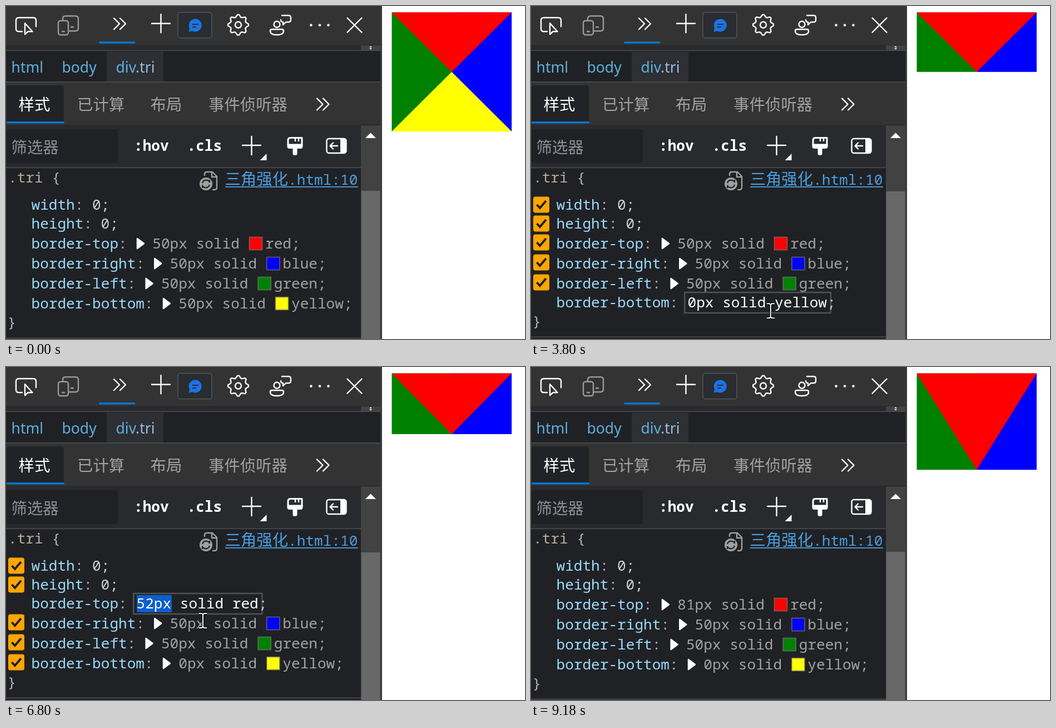
These frames come from a looping animation (933 px wide and 600 px high, 9.21 s). An HTML page:

```html
<!DOCTYPE html>
<html lang="zh">
<head>
<meta charset="utf-8">
<title>CSS border triangle</title>
<style>
  html, body { margin: 0; width: 100%; height: 100%; overflow: hidden; background: #fff; }
  svg { display: block; }
  text { white-space: pre; }
  .ui { font: 26.5px "Noto Sans", "Open Sans", sans-serif; }
  .cjk { font: 300 28.4px "Noto Sans CJK SC", "Noto Sans CJK", sans-serif; }
  .code { font: 26.1px "Noto Sans Mono", "DejaVu Sans Mono", monospace; }
  .bold { font-weight: 700; }
  .line { fill: none; stroke: #fff; stroke-width: 2.4; stroke-linecap: round; stroke-linejoin: round; }
  .dim { stroke: #9a9a9a; }
</style>
</head>
<body>
<svg width="933" height="600" viewBox="0 0 933 600">
  <!-- panel backgrounds -->
  <rect width="676" height="600" fill="#202124"/>
  <rect width="674" height="70" fill="#333"/>
  <rect y="70" width="674" height="10" fill="#292a2d"/>
  <rect x="638" y="71" width="35" height="9" fill="#424242"/>
  <path d="M653 74.5l2.500-2.500 2.500 2.500zM653 76l2.500 2.500 2.500-2.500z" fill="#fff"/>
  <rect y="79.500" width="674" height="1.500" fill="#494c50"/>
  <rect x="181" y="82" width="102" height="54" fill="#2d2f33"/>
  <rect y="136" width="674" height="1.800" fill="#494c50"/>
  <rect y="138" width="674" height="76" fill="#333"/>
  <path d="M1 211V147q0-4 4-4h95q4 0 4 4v64z" fill="#222326"/>
  <rect x="1" y="208" width="104" height="3.500" rx="1.500" fill="#0078d4"/>
  <rect y="214" width="638" height="77" fill="#292a2d"/>
  <rect x="1" y="222" width="200" height="61" rx="4" fill="#202124"/>
  <rect y="290.500" width="638" height="1.600" fill="#494c50"/>
  <rect x="638" y="215" width="35" height="385" fill="#424242"/>
  <path d="M646 238l9.500-9.500 9.500 9.500z" fill="#fff"/>
  <rect x="673" width="3" height="600" fill="#3a3b3e"/>

  <!-- main toolbar -->
  <g class="line">
    <path d="M29 46h-6q-5 0-5-5V26q0-5 5-5h26q5 0 5 5v11M34 31v20l5.500-5h8z"/>
    <path class="dim" d="M102 25v-2q0-5 5-5h18q5 0 5 5v17q0 5-5 5h-11M117 38h4"/>
    <rect class="dim" x="94" y="26.500" width="18" height="25.500" rx="4"/>
    <path class="dim" d="M101 46h4"/>
    <path d="M194 22l10 10-10 10M205 22l10 10-10 10M262 31.500h33M278.500 15v33"/>
    <path id="gear"/>
    <circle cx="417.500" cy="34" r="5.500"/>
    <circle cx="487" cy="33" r="5.500"/>
    <path d="M478 42h18q3 0 3 3 0 7-12 7t-12-7q0-3 3-3zM496 17h12q4 0 4 4v4q0 4-4 4h-5l-5 5v-5q-4 0-4-4"/>
    <path d="M613.500 21.500l26 26M639.500 21.500l-26 26"/>
  </g>
  <rect x="167" y="64" width="65.500" height="3.600" rx="1.800" fill="#0078d4"/>
  <rect x="309" y="11.500" width="61" height="46" rx="4" fill="#292c30" stroke="#52565b" stroke-width="1.500"/>
  <path d="M328.500 46.500l1.500-6.500a11.500 11.500 0 1 1 5 5z" fill="#1a73e8"/>
  <path d="M335 33h11M335 38h7" stroke="#292c30" stroke-width="2"/>
  <g fill="#fff"><circle cx="548.500" cy="34.500" r="2.300"/><circle cx="564" cy="34.500" r="2.300"/><circle cx="579.500" cy="34.500" r="2.300"/></g>

  <!-- breadcrumbs and tabs -->
  <g class="ui" fill="#5db0e0">
    <text x="9.500" y="120">html</text>
    <text x="100.500" y="120">body</text>
    <text x="197.500" y="120">div<tspan fill="#9bbbdc">.tri</tspan></text>
  </g>
  <g class="cjk" fill="#a3a3a3">
    <text x="22.500" y="188" fill="#fff" style="font-weight:400">样式</text>
    <text x="128" y="188">已计算</text>
    <text x="259.500" y="188">布局</text>
    <text x="364" y="188">事件侦听器</text>
    <text x="9.500" y="265" fill="#8d9196">筛选器</text>
  </g>
  <path class="line" d="M559 166.500l10.500 10.500-10.500 10.500M570 166.500l10.500 10.500-10.500 10.500"/>

  <!-- styles toolbar -->
  <g class="code" fill="#fff">
    <text class="bold" x="230" y="261">:hov</text>
    <text class="bold" x="325.500" y="261">.cls</text>
  </g>
  <path class="line" d="M425 251h33M441.500 235v33"/>
  <path d="M468.500 266v12h-12z" fill="#fff"/>
  <path class="line" d="M507 250v-8q0-4.500 4.500-4.500h20.500v12.500z" style="stroke-width:3"/>
  <path d="M520 238v6M526 238v6" stroke="#fff" stroke-width="2.500"/>
  <path d="M505.500 249h28v4q0 4-4 4h-6v9q0 3-4 3t-4-3v-9h-6q-4 0-4-4z" fill="#fff"/>
  <rect class="line" x="576.500" y="239" width="35" height="26" rx="4"/>
  <path d="M601 239h7q4 0 4 4v18q0 4-4 4h-7z" fill="#fff"/>
  <path class="line" d="M596 252h-13M588 246.500l-5.500 5.500 5.500 5.500"/>

  <!-- rule header -->
  <text class="code" x="4" y="318" fill="#b5ad9a">.tri <tspan fill="#b4b4b4">{</tspan></text>
  <g class="line" style="stroke:#a0a0a0">
    <path d="M357 305v-2q0-4 4-4h10l8 8v20q0 4-4 4h-3M370 299v9h9"/>
  </g>
  <circle cx="359.500" cy="320.500" r="11.500" fill="#a0a0a0"/>
  <path d="M353 319a7 7 0 0 1 12-3l1 2v-5M366 322a7 7 0 0 1-12 3l-1-2v5" fill="none" stroke="#202124" stroke-width="2.200"/>
  <text class="code" x="393.500" y="322" fill="#4a9fe0"><tspan class="cjk">三角强化</tspan>.html:10</text>
  <rect x="394" y="325" width="239" height="1.800" fill="#4a9fe0"/>

  <g id="rule" class="code"></g>
  <g id="preview"></g>
  <g id="arrow"><path d="M0 0v24.500l5.500-5 4.500 10 4.500-2-4.300-9.500h7.300z" fill="#fff" stroke="#000" stroke-width="1.200"/></g>
  <g id="beam" fill="none">
    <path id="beamShape" d="M-7-13h5l2 2 2-2h5M0-11v22M-7 13h5l2-2 2 2h5" stroke="#000" stroke-width="4.500"/>
    <use href="#beamShape" style="display:none"/>
    <path d="M-7-13h5l2 2 2-2h5M0-11v22M-7 13h5l2-2 2 2h5" stroke="#fff" stroke-width="2"/>
  </g>
</svg>
<script>
const LOOP = 9210, CHAR = 15.66, BLINK = 540;
const $ = id => document.getElementById(id);

// Pointer hot spot: time, x, y
const PATH = [
  [150, 412, 599], [700, 326, 538], [1410, 326, 538], [1570, 311, 538],
  [1750, 311, 538], [2070, 441.5, 561], [3690, 441.5, 561], [4330, 307, 415],
  [4500, 307, 415], [4600, 289, 430], [4990, 289, 430], [5340, 264, 430],
  [5560, 264, 430], [5770, 354, 457], [8430, 354, 457], [8620, 570, 482],
  [8800, 755, 553], [8960, 842, 602]
];
// Caret: time it is placed, index in the edited text
const CARETS = [[1570, 2], [2650, 1], [2770, 0], [2980, 1], [5390, 2]];

const ROWS = [
  { name: 'width', y: 367 },
  { name: 'height', y: 401 },
  { name: 'border-top', y: 437, color: 'red' },
  { name: 'border-right', y: 473, color: 'blue' },
  { name: 'border-left', y: 509, color: 'green' },
  { name: 'border-bottom', y: 545, color: 'yellow' }
];

const ease = u => u * u * (3 - 2 * u);

function pointer(t) {
  const i = PATH.findIndex(k => k[0] > t);
  if (i < 1) return null;
  const [t0, x0, y0] = PATH[i - 1], [t1, x1, y1] = PATH[i];
  const u = t0 >= 8430 ? (t - t0) / (t1 - t0) : ease((t - t0) / (t1 - t0));
  return { x: x0 + (x1 - x0) * u, y: y0 + (y1 - y0) * u };
}

const bottomSize = t => t < 2650 ? '50' : t < 2770 ? '5' : t < 2980 ? '' : '0';

const topSize = t => t < 6310 ? 50 : t < 6800 ? 51 :
  Math.min(81, 52 + Math.floor((t - 6800) / 31));

const editedRow = t => t < 860 || t >= 9130 ? -1 : t < 4740 ? 5 : 2;

const rect = (x, y, w, h, rest) =>
  `<rect x="${x}" y="${y}" width="${w}" height="${h}" ${rest}/>`;
const text = (x, y, fill, s) => `<text x="${x}" y="${y}" fill="${fill}">${s}</text>`;

function checkbox(y) {
  return rect(4, y - 14.5, 29, 29, 'rx="4" fill="#ffa500"') +
    `<path d="M10.500 ${y}l5.500 6 11-13" fill="none" stroke="#202124" stroke-width="4"/>`;
}

function caret(t, x, y) {
  const last = CARETS.filter(c => c[0] <= t).pop();
  if (!last || Math.floor((t - last[0]) / BLINK) % 2) return '';
  return rect(x + last[1] * CHAR - 0.8, y - 27, 2, 33, 'fill="#fff"');
}

function editor(t, x, y, value) {
  const w = value.length * CHAR;
  const all = t < 1570 || (t >= 4740 && t < 5390);
  const picked = all ? value.length : t >= 6310 ? 4 : 0;
  return rect(x - 6, y - 27, w + 12, 37, 'fill="#202124" stroke="#505256" stroke-width="2.500"') +
    rect(x, y - 24, picked * CHAR, 31, 'fill="#0a5fd0"') +
    text(x - 0.7, y, '#fff', value) + text(x + w - 0.7, y, '#ccc', ';') +
    (picked ? '' : caret(t, x, y));
}

function declaration(x, y, size, color) {
  const swatch = x + 46 + (size + ' solid ').length * CHAR;
  return `<path d="M${x + 16.5} ${y - 18}q0-2 2-1l12 9q1 1 0 2l-12 9q-2 1-2-1z" fill="#fff"/>` +
    text(x + 45, y, '#a3a3a3', size + ' solid ') +
    rect(swatch + 1, y - 20.5, 23, 23, `fill="${color}" stroke="#808080" stroke-opacity=".6" stroke-width="1.800"`) +
    text(swatch + 29.5, y, '#a3a3a3', color + ';');
}

function ruleMarkup(t, hover) {
  const editing = editedRow(t);
  const shift = editing < 0 ? 0 : 2;
  const sizes = [0, 0, topSize(t), 50, 50, bottomSize(t)];
  const rows = ROWS.map((row, i) => {
    const y = row.y - (shift && i >= editing ? 2 : 0);
    const end = 46 + (row.name.length + 1) * CHAR;
    const size = sizes[i] + 'px';
    let out = text(45.5, y, '#9bdcfd', `${row.name}<tspan fill="#b4b4b4">:</tspan>`);
    if (!row.color) out += text(end + CHAR - 0.7, y, '#d2d2d2', '0;');
    else if (i === editing) out += editor(t, end + 17, y, `${size} solid ${row.color}`);
    else out += declaration(end, y, size, row.color);
    if (hover && i !== editing) out += checkbox(y - (row.color ? 11 : 9));
    return out;
  });
  return rect(0, 597.5 - shift, 638, 1.6, 'fill="#494c50"') +
    rect(638.5, shift ? 334 : 333, 34, 267, 'fill="#686868"') +
    text(2.5, 579 - shift, '#b4b4b4', '}') + rows.join('');
}

function previewMarkup(t) {
  const scale = 2.145, left = 693.5, right = 909, mid = 801.2, top = 11.5;
  const apex = top + topSize(t - 30) * scale;
  const base = apex + bottomSize(t) * scale;
  const tri = (y, fill) =>
    `<polygon points="${left},${y} ${right},${y} ${mid},${apex}" fill="${fill}"/>`;
  return rect(left, top, mid - left, base - top, 'fill="green"') +
    rect(mid, top, right - mid, base - top, 'fill="blue"') +
    tri(top, 'red') + (base > apex ? tri(base, 'yellow') : '');
}

const shown = {};
function put(id, markup) {
  if (shown[id] !== markup) $(id).innerHTML = shown[id] = markup;
}

function place(id, p, on) {
  const el = $(id);
  el.style.display = on ? '' : 'none';
  if (on) el.setAttribute('transform', `translate(${p.x.toFixed(1)} ${p.y.toFixed(1)})`);
}

function gearPath() {
  const points = [];
  for (let i = 0; i < 32; i++) {
    const r = i % 4 < 2 ? 18.5 : 14.5;
    const a = (i - 0.5 + (i % 2 ? -0.1 : 0.1)) * Math.PI / 16;
    points.push(`${(417.5 + r * Math.cos(a)).toFixed(1)} ${(34 + r * Math.sin(a)).toFixed(1)}`);
  }
  return `M${points.join('L')}Z`;
}

function draw() {
  const t = performance.now() % LOOP;
  const p = pointer(t);
  const overText = p && p.x < 560 && p.y < 555;
  put('rule', ruleMarkup(t, p && p.x < 638 && p.y < 597));
  put('preview', previewMarkup(t));
  place('arrow', p, p && !overText);
  place('beam', p, overText);
  requestAnimationFrame(draw);
}

$('gear').setAttribute('d', gearPath());
draw();
</script>
</body>
</html>
```
